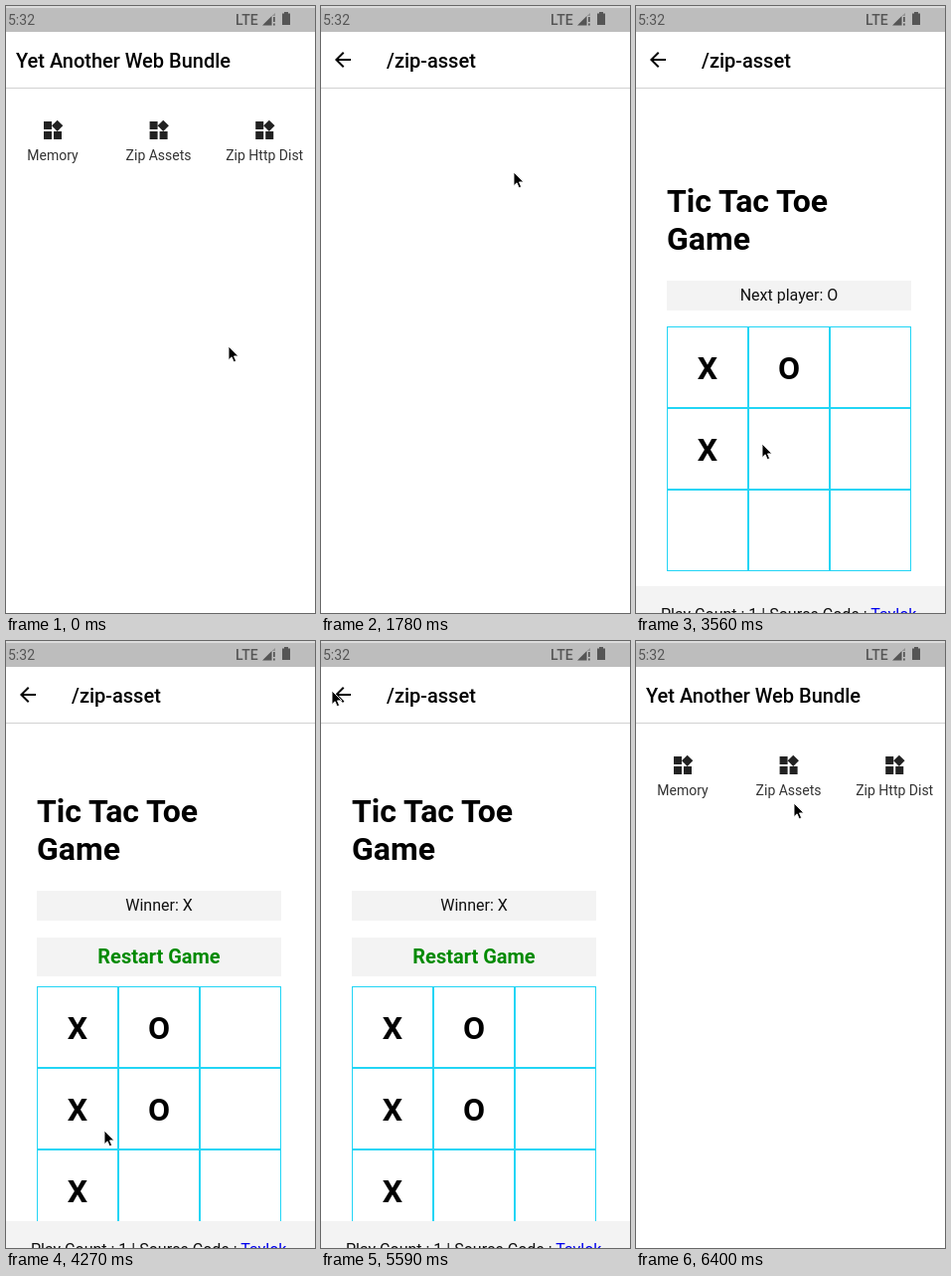
An HTML page that plays this animation: 311x610 px, repeating every 6.58 s.

```html
<!DOCTYPE html>
<html lang="en">
<head>
<meta charset="utf-8">
<title>Web bundle demo</title>
<style>
  html, body { margin: 0; width: 100%; height: 100%; overflow: hidden; background: #fff; }
  svg { display: block; width: 311px; height: 610px; font-family: Roboto, sans-serif; }
  .title { font-size: 20px; font-weight: 500; }
  .label { font-size: 14px; fill: #333; text-anchor: middle; }
  .body { font-size: 16px; fill: #111; }
  .mid { text-anchor: middle; }
  .head { font-size: 32px; font-weight: 700; }
  .restart { font-size: 20px; font-weight: 700; fill: #008a00; }
  .panel { fill: #f3f3f3; }
  .cell { fill: none; stroke: #22d5f5; }
</style>
</head>
<body>
<svg viewBox="0 0 311 610">
  <defs>
    <path id="widgets" fill="#222" d="M13 13v8h8v-8zM3 21h8v-8H3zM3 3v8h8V3zm13.66-1.31L11 7.34 16.66 13l5.66-5.66z"/>
    <g id="paper">
      <rect width="311" height="610" fill="#fff"/>
      <rect y="82" width="311" height="1" fill="#d2d2d2"/>
    </g>
  </defs>

  <g id="home">
    <use href="#paper"/>
    <text class="title" x="10" y="62">Yet Another Web Bundle</text>
    <g id="entries"></g>
  </g>
  <rect id="scrim" width="311" height="610"/>

  <g id="page">
    <use href="#paper"/>
    <path transform="translate(10 42)" d="M20 11H7.83l5.59-5.59L12 4l-8 8 8 8 1.41-1.41L7.83 13H20z"/>
    <text class="title" x="66" y="62">/zip-asset</text>
    <g id="game">
      <g id="upper">
        <text class="head" x="31" y="207">Tic Tac Toe</text>
        <text class="head" x="31" y="245">Game</text>
        <rect class="panel" x="31" y="276" width="246" height="30"/>
        <text class="body mid" id="status" x="154" y="296"></text>
      </g>
      <g id="restart">
        <rect class="panel" x="31" y="298" width="246" height="39"/>
        <text class="restart mid" x="154" y="324">Restart Game</text>
      </g>
      <g id="board"></g>
      <rect class="panel" y="583" width="311" height="27"/>
      <text class="body" x="25" y="617">Play Count : 1 | Source Code : <tspan fill="#00e">Tavlok</tspan></text>
    </g>
  </g>

  <rect y="2" width="311" height="24" fill-opacity=".26"/>
  <rect width="311" height="2" fill="#dcdcdc"/>
  <g fill="#555" font-size="14">
    <text x="2" y="19">5:32</text>
    <text x="231" y="19" font-weight="500">LTE</text>
    <path d="M258 19.500L267.500 10V19.500z"/>
    <path d="M268 9.500L271 7V10H268z" opacity=".4"/>
    <path d="M269 11h1.700v5H269zM269 17.500h1.700v2H269z"/>
    <path d="M280 6h4v1.500h2V19h-8V7.500h2z"/>
  </g>
  <path id="cursor" d="M1 1V14.700L4.100 11.800L6.200 16.700L8.600 15.700L6.500 10.900H10.900Z" stroke="#fff" stroke-width=".9"/>
</svg>
<script>
const $ = id => document.getElementById(id);
const LOOP = 6580, STEP = 1000 / 11.25;

$('entries').innerHTML = ['Memory', 'Zip Assets', 'Zip Http Dist'].map((name, i) => {
  const x = 47 + i * 106.6;
  return `<use href="#widgets" x="${x - 12}" y="113"/><text class="label" x="${x}" y="155">${name}</text>`;
}).join('');

$('board').innerHTML = Array.from({ length: 9 }, (_, i) => {
  const x = 31 + i % 3 * 82, y = 322 + Math.floor(i / 3) * 82;
  return `<rect class="cell" x="${x + .5}" y="${y + .5}" width="81" height="81"/>
    <text class="head mid" x="${x + 41}" y="${y + 53}"></text>`;
}).join('');
const marks = $('board').querySelectorAll('text');

// [step, cell]: X and O take turns
const moves = [[33, 0], [36, 1], [39, 3], [42, 4], [47, 6]];
const SHOWN = 23, WON = 47;

// [step, x, y] of the pointer
const path = [
  [4, 223, 341], [12, 161, 146], [14, 155, 129], [17, 155, 129], [20, 193, 166],
  [25, 202, 290], [31, 100, 353], [33, 88, 359], [34, 88, 359], [36, 131, 362],
  [39, 101, 433], [40, 126, 439], [42, 140, 445], [43, 140, 445], [47, 96, 498],
  [48, 98, 491], [51, 126, 413], [59, 9, 50], [60, 8, 49], [61, 8, 49],
  [63, 10, 49], [65, 10, 49], [72, 158, 162]
];

function pointer(n) {
  const i = path.findIndex(p => p[0] >= n);
  if (i < 0) return path[path.length - 1].slice(1);
  if (i === 0) return path[0].slice(1);
  const a = path[i - 1], b = path[i];
  const k = (n - a[0]) / (b[0] - a[0]), e = k * k * (3 - 2 * k);
  return [1, 2].map(j => Math.round(a[j] + (b[j] - a[j]) * e));
}

const show = (id, on) => $(id).style.display = on ? '' : 'none';
const zoom = (id, s) =>
  $(id).setAttribute('transform', `translate(155.500 305) scale(${s}) translate(-155.500 -305)`);

function draw(n) {
  const inPage = n >= 18 && n < 66, won = n >= WON;
  show('page', inPage);
  show('game', n >= SHOWN);
  show('restart', won);

  // zoom transitions when opening and closing the page
  zoom('page', { 18: .96, 19: .99 }[n] || 1);
  zoom('home', { 66: 1.04, 67: 1.01 }[n] || 1);
  $('scrim').setAttribute('opacity', inPage ? Math.min(.6, (n - 17) * .27) : 0);

  const done = moves.filter(m => n >= m[0]);
  marks.forEach((el, cell) => {
    const turn = done.findIndex(m => m[1] === cell);
    el.textContent = turn < 0 ? '' : 'XO'[turn % 2];
  });
  $('status').textContent = won ? 'Winner: X' : 'Next player: ' + 'XO'[done.length % 2];
  $('upper').setAttribute('transform', `translate(0 ${won ? -25 : 0})`);
  $('board').setAttribute('transform', `translate(0 ${won ? 25 : 0})`);
  $('cursor').setAttribute('transform', `translate(${pointer(n)})`);
}

const start = performance.now();
function tick() {
  const t = (performance.now() - start) % LOOP;
  draw(Math.min(73, Math.floor((t + 12) / STEP)));
  requestAnimationFrame(tick);
}
tick();
</script>
</body>
</html>
```
